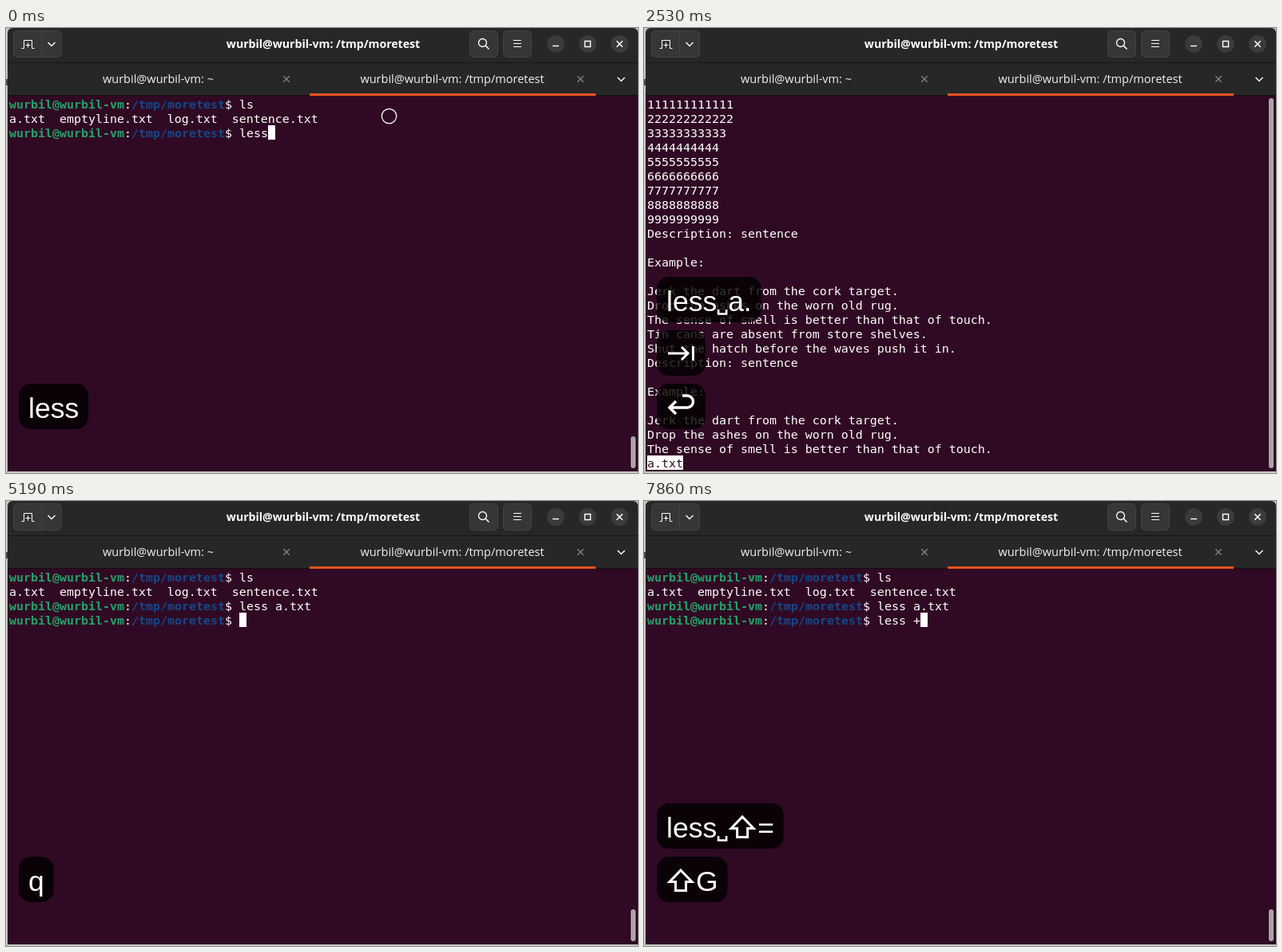
Animation of 791 by 558 pixels, one loop 8 s. Source, as an HTML page with a canvas:

```html
<!DOCTYPE html>
<html lang="en">
<head>
<meta charset="utf-8">
<title>Terminal</title>
<style>
html, body { margin: 0; width: 100%; height: 100%; overflow: hidden; background: #c6c6c6; }
canvas { display: block; }
</style>
</head>
<body>
<canvas id="stage" width="791" height="558"></canvas>
<script>
const ctx = document.getElementById('stage').getContext('2d');
const LOOP = 8000, CELL = 9, ROW = 18, LEFT = 4, TOP = 86;
const BG = '#300a24', WHITE = '#ffffff';
const MONO = '14.95px "DejaVu Sans Mono", monospace';
const UI = '"Open Sans", "Noto Sans", sans-serif';
const KEY_FONT = '35.5px "Liberation Sans", Arial, sans-serif';
const HOST = 'wurbil@wurbil-vm', DIR = '/tmp/moretest';

const FILE = [
  '111111111111', '222222222222', '33333333333', '4444444444', '5555555555',
  '6666666666', '7777777777', '8888888888', '9999999999',
  'Description: sentence', '', 'Example:', '',
  'Jerk the dart from the cork target.',
  'Drop the ashes on the worn old rug.',
  'The sense of smell is better than that of touch.',
  'Tin cans are absent from store shelves.',
  'Shut the hatch before the waves push it in.',
  'Description: sentence', '', 'Example:', '',
  'Jerk the dart from the cork target.',
  'Drop the ashes on the worn old rug.',
  'The sense of smell is better than that of touch.'
];

// Timelines: [start ms, value...]
const FIRST_CMD = [[0, 'less'], [450, 'less '], [600, 'less a'], [890, 'less a.'], [1490, 'less a.txt ']];
const SECOND_CMD = [[5190, ''], [5930, 'l'], [6080, 'le'], [6230, 'les'], [6380, 'less'],
  [6520, 'less '], [6820, 'less +']];
const CARET = [[0, true], [2530, false], [3120, true], [3710, false], [4300, true], [4900, false],
  [5040, true], [7420, false], [7860, true]];
const POINTER = [[3410, 200, 100, false], [3560, 300, 98, false], [3710, 364, 87, false],
  [3860, 330, 93, false], [4000, 270, 97, false], [4150, 228, 97, true], [4300, 226, 98, true],
  [4450, 232, 112, false], [4600, 246, 130, true], [4750, 246, 130, false]];
const KEYS = [
  { steps: [[0, 'less'], [450, 'less␣'], [740, 'less␣a'], [890, 'less␣a.']], fade: 2830 },
  { steps: [[1490, '⇥']], fade: 3410 },
  { steps: [[1930, '↩']], fade: 3860 },
  { steps: [[4900, 'q']], fade: 6820 },
  { steps: [[5790, 'l'], [5930, 'le'], [6080, 'les'], [6230, 'less'], [6520, 'less␣'], [6820, 'less␣⇧=']], fade: LOOP },
  { steps: [[7710, '⇧'], [7860, '⇧G']], fade: LOOP }
];
const PAGER = [1930, 5040], SELECTED = 4300, POINTER_OFF = 4900;

const stepAt = (steps, t) => steps.filter(s => s[0] <= t).pop();

function rect(x, y, w, h, color) {
  ctx.fillStyle = color;
  ctx.fillRect(x, y, w, h);
}

function roundRect(x, y, w, h, r, fill, stroke) {
  ctx.beginPath();
  ctx.roundRect(x, y, w, h, r);
  ctx.fillStyle = fill;
  ctx.fill();
  if (stroke) {
    ctx.strokeStyle = stroke;
    ctx.lineWidth = 1;
    ctx.stroke();
  }
}

function path(d, x, y, color, width) {
  ctx.save();
  ctx.translate(x, y);
  ctx.strokeStyle = color;
  ctx.lineWidth = width;
  ctx.stroke(new Path2D(d));
  ctx.restore();
}

function circle(x, y, r, fill, stroke, width = 1) {
  ctx.beginPath();
  ctx.arc(x, y, r, 0, Math.PI * 2);
  if (fill) { ctx.fillStyle = fill; ctx.fill(); }
  if (stroke) { ctx.strokeStyle = stroke; ctx.lineWidth = width; ctx.stroke(); }
}

function label(text, x, y, font, color, align = 'left') {
  ctx.font = font;
  ctx.textAlign = align;
  ctx.fillStyle = color;
  ctx.fillText(text, x, y);
}

function term(text, col, row, color = WHITE, bold = false) {
  label(text, LEFT + col * CELL, TOP + row * ROW + 15, (bold ? 'bold ' : '') + MONO, color);
}

function block(col, row, cells) {
  rect(LEFT + col * CELL, TOP + row * ROW, cells * CELL, ROW, WHITE);
}

function inverse(text, row) {
  block(0, row, text.length);
  term(text, 0, row, BG);
}

function prompt(row, cmd) {
  const dirCol = HOST.length + 1, end = dirCol + DIR.length;
  term(HOST, 0, row, '#26a269', true);
  term(':', HOST.length, row);
  term(DIR, dirCol, row, '#12488b', true);
  term('$ ' + cmd, end, row);
  return end + 2 + cmd.length;
}

function drawWindow() {
  rect(0, 0, 791, 558, '#c6c6c6');
  rect(0, 64, 2, 8, '#4a4a4a');
  roundRect(2, 0, 789, 556, [6, 6, 0, 0], '#272727');
  rect(2, 43, 789, 1, '#161616');
  rect(2, 84, 789, 1, '#101010');
  rect(2, 85, 789, 471, BG);
  rect(380, 82, 358, 3, '#e95420');

  for (const [x, w] of [[9.5, 60], [580.5, 35], [622.5, 35]]) {
    roundRect(x, 3.5, w, 33, 5, '#363636', '#434343');
  }
  rect(44, 4, 1, 33, '#434343');
  path('M0 10H3V0H13V10H16M8 3V9M5 6H11', 19.5, 15.5, WHITE, 1);
  const chevron = 'M-4.5 -2L0 2.5L4.5 -2';
  path(chevron, 57, 20, WHITE, 1.4);
  path(chevron, 770, 64, WHITE, 1.4);
  circle(596.5, 18.5, 5, null, WHITE, 1.3);
  path('M0 0L4.5 4.5', 600, 22, WHITE, 1.6);
  path('M0 0H10M0 4H10M0 8H10', 635, 15.5, WHITE, 1);

  for (const x of [688, 728, 768]) circle(x, 20, 11, '#3b3b3b');
  path('M-4 0H4', 688, 22.5, WHITE, 1.4);
  path('M-3.5 -3.5H3.5V3.5H-3.5Z', 728, 20, WHITE, 1.4);
  const cross = 'M-3.7 -3.7L3.7 3.7M3.7 -3.7L-3.7 3.7';
  path(cross, 768, 20, WHITE, 1.5);
  path(cross, 351, 64, '#858585', 1.3);
  path(cross, 719, 64, '#858585', 1.3);

  label(HOST + ': ' + DIR, 397, 25, 'bold 14.1px ' + UI, WHITE, 'center');
  label(HOST + ': ~', 190.5, 69, '14.5px ' + UI, '#f2f2f2', 'center');
  label(HOST + ': ' + DIR, 558.5, 69, '14.5px ' + UI, '#f2f2f2', 'center');
}

function drawScrollbar(y) {
  roundRect(782, y, 6, 552 - y, 3, '#aca3a9');
}

function drawShell(t, caret) {
  prompt(0, 'ls');
  term('a.txt  emptyline.txt  log.txt  sentence.txt', 0, 1);
  let row = 2, col = prompt(row, stepAt(FIRST_CMD, t)[1]);
  const next = stepAt(SECOND_CMD, t);
  if (next) col = prompt(++row, next[1]);
  else if (t >= PAGER[1]) { row++; col = 0; }
  if (caret) block(col, row, 1);
  drawScrollbar(512);
}

function drawPager(t, caret) {
  FILE.forEach((line, i) => term(line, 0, i));
  if (t >= SELECTED) inverse(FILE[0], 0);
  inverse('a.txt', FILE.length);
  if (caret) block(5, FILE.length, 1);
  drawScrollbar(88);
}

// Key symbols are drawn from the baseline; w is the advance.
const SYMBOLS = {
  '␣': { w: 14, d: 'M2 -3V2.5H12V-3', line: 2.6 },
  '⇧': { w: 37, d: 'M18 -27L32 -12.5H24.5V-1.5H11.5V-12.5H4Z', line: 3 },
  '⇥': { w: 37, d: 'M2 -15H27M19 -23L27 -15L19 -7M33.5 -24V-6', line: 3 },
  '↩': { w: 37, d: 'M4 -14H26A7.5 7.5 0 0 0 26 -29H20M12 -22L4 -14L12 -6', line: 3.4 }
};

function drawKey(text, slot, alpha) {
  ctx.font = KEY_FONT;
  const parts = text.match(/[␣⇧⇥↩]|[^␣⇧⇥↩]+/g).map(s => {
    const sym = SYMBOLS[s];
    return { s, sym, w: sym ? sym.w : ctx.measureText(s).width };
  });
  const width = parts.reduce((sum, p) => sum + p.w, 24);
  const y = 446 - slot * 67;
  ctx.globalAlpha = alpha;
  roundRect(16, y, width, 57, 15, 'rgba(0,0,0,0.8)');
  let x = 28;
  for (const { s, sym, w } of parts) {
    if (sym) path(sym.d, x, y + 44, WHITE, sym.line);
    else label(s, x, y + 43, KEY_FONT, WHITE);
    x += w;
  }
  ctx.globalAlpha = 1;
}

function drawKeys(t) {
  const shown = KEYS.filter(k => k.steps[0][0] <= t);
  shown.forEach((key, i) => {
    const age = t - key.fade;
    const alpha = age < 0 ? 1 : age < 140 ? 0.55 : age < 285 ? 0.22 : 0;
    if (alpha) drawKey(stepAt(key.steps, t)[1], shown.length - 1 - i, alpha);
  });
}

function ring(x, y) {
  circle(x, y, 9.2, null, WHITE, 1.2);
}

function drawPointer(t) {
  if (t < 150) ring(479.5, 110.5);
  const p = t < POINTER_OFF && stepAt(POINTER, t);
  if (!p) return;
  const [, x, y, pressed] = p;
  const beam = 'M-3 -7.5H3M0 -7.5V7.5M-3 7.5H3';
  path(beam, x + 0.5, y, '#000000', 3.5);
  path(beam, x + 0.5, y, WHITE, 1.5);
  if (pressed) ring(x + 0.5, y);
}

function frame(now) {
  const t = now % LOOP;
  const caret = stepAt(CARET, t)[1];
  drawWindow();
  if (t >= PAGER[0] && t < PAGER[1]) drawPager(t, caret);
  else drawShell(t, caret);
  drawKeys(t);
  drawPointer(t);
}

const start = performance.now();
function tick() {
  frame(performance.now() - start);
  requestAnimationFrame(tick);
}
tick();
</script>
</body>
</html>
```
